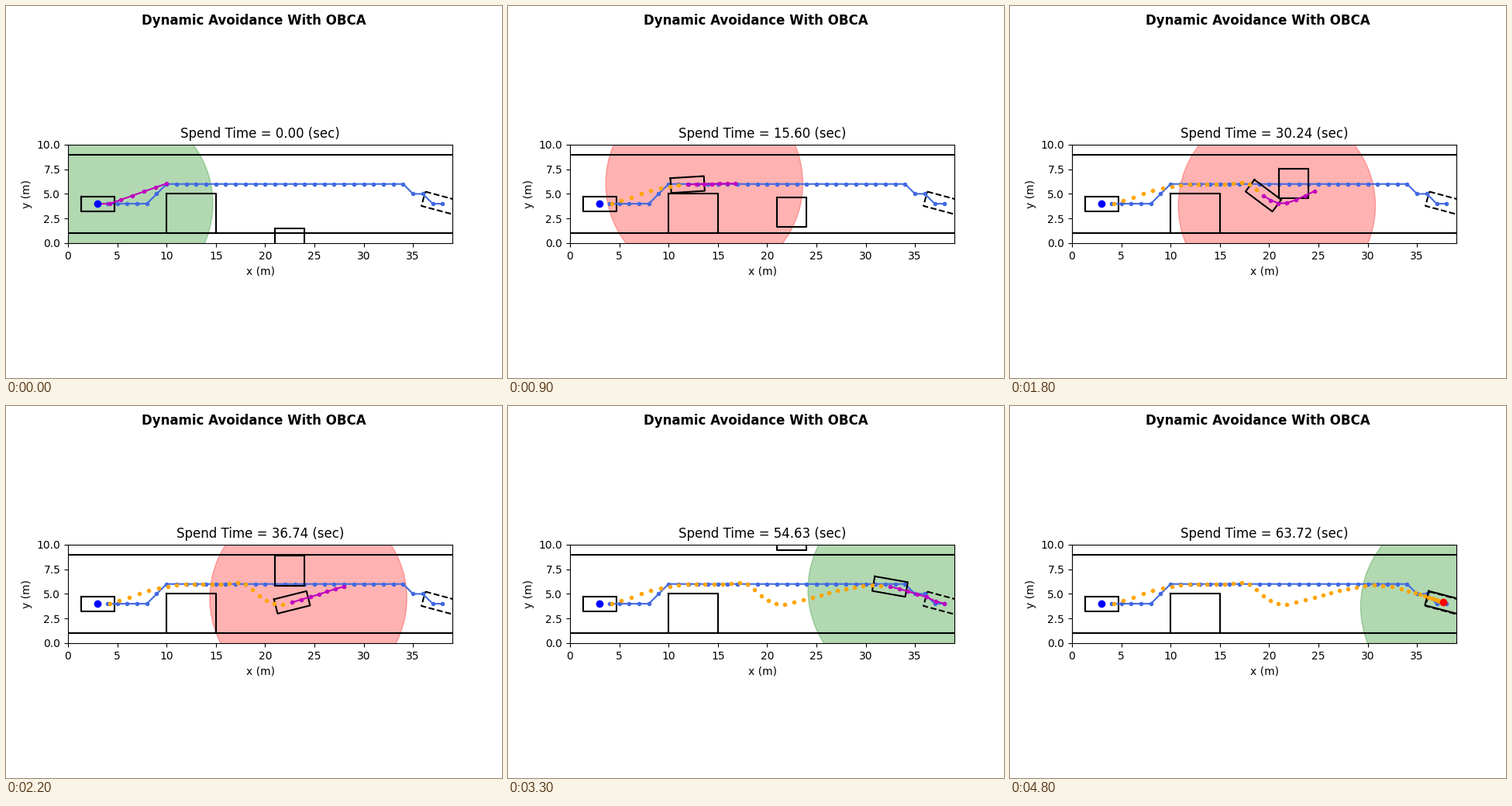
Animation, 640 px wide and 480 px high, one loop 4.9 s. Source, as a matplotlib script:

```python
import numpy as np
import matplotlib.pyplot as plt
from matplotlib.animation import FuncAnimation
from matplotlib.patches import Circle

FRAMES, INTERVAL = 49, 100
HALF_LEN, HALF_WID, SENSE = 1.7, 0.75, 10
HORIZON = 6      # steps in one plan
SWERVE = 14      # step at which plans start to bend round the mover
LAST = 33        # step at which the goal comes within one plan
GOAL = np.array([38.0, 4.0])
GOAL_TILT = -15  # degrees

# Step, x, y of the car's way points
KEYS = np.array([
    (0, 3, 4), (1, 4.23, 4), (2, 5.2, 4.31), (6, 9.18, 5.6), (8, 11.02, 5.87),
    (13, 15.47, 5.98), (16, 18.02, 5.95), (18, 19.42, 4.82), (20, 20.95, 4.01),
    (24, 24.58, 4.67), (28, 28, 5.52), (31, 30.65, 5.87), (LAST, 32.47, 5.74)])


def hermite(q, t, v):
    """Smooth curve through the points (t, v), read at q."""
    m = np.gradient(v, t)
    i = np.clip(np.searchsorted(t, q, side="right") - 1, 0, len(t) - 2)
    h = t[i + 1] - t[i]
    u = (q - t[i]) / h
    return ((1 + 2 * u) * (1 - u) ** 2 * v[i] + u * (1 - u) ** 2 * h * m[i]
            + u * u * (3 - 2 * u) * v[i + 1] + u * u * (u - 1) * h * m[i + 1])


def approach(u):
    """Points on the final stretch; u is the share of it still to go."""
    dx, dy = KEYS[-1, 1:] - GOAL
    return np.column_stack([GOAL[0] + dx * u,
                            GOAL[1] + dy * u + 0.35 * u * (1 - u)])


def route_height(x):
    return np.interp(x, [8, 10, 34, 35, 36, 37], [4, 6, 6, 5, 5, 4])


share = np.arange(HORIZON + 1) / HORIZON
steps = np.arange(LAST + 1)
cruise = np.column_stack([hermite(steps, KEYS[:, 0], KEYS[:, i]) for i in (1, 2)])

# Near the goal each step covers one sixth of what remains
left = (1 - 1 / HORIZON) ** np.arange(1, FRAMES - LAST)
track = np.vstack([cruise, approach(left)])
nominal = np.vstack([cruise, approach(1 - share[1:])])

grad = np.gradient(track, axis=0)
heading = np.arctan2(grad[:, 1], grad[:, 0])
heading[LAST + 1:] = np.radians(GOAL_TILT + 4.5 * left)

clock = np.cumsum(np.r_[0, 2.592, np.full(LAST - 1, 1.6262),
                        1.62 * np.r_[1, left[:-1]]])


def box(center, angle=0.0, hl=HALF_LEN, hw=HALF_WID):
    c, s = np.cos(angle), np.sin(angle)
    pts = np.array([(-hl, hw), (hl, hw), (hl, -hw), (-hl, -hw), (-hl, hw)])
    return (pts @ np.array([(c, s), (-s, c)]) + center).T


def plan(k):
    if k > LAST:
        return approach(left[k - LAST - 1] * (1 - share))
    if k >= SWERVE:
        pts = nominal[k:k + HORIZON + 1].copy()
        pts[:, 1] += 0.45 * share ** 3 * (route_height(pts[:, 0]) - pts[:, 1])
        return pts
    end = track[k, 0] + 7 - 0.24 * k, 6.05
    return np.vstack([track[k], np.linspace(track[k + 1], end, HORIZON)])


fig, ax = plt.subplots(figsize=(6.4, 4.8), dpi=100)
fig.suptitle("Dynamic Avoidance With OBCA", fontsize=12, fontweight="bold")
ax.set_aspect("equal")
ax.set_xlim(0, 39)
ax.set_ylim(0, 10)
ax.set_xticks(range(0, 36, 5))
ax.set_yticks(np.arange(0, 10.1, 2.5))
ax.set_xlabel("x (m)")
ax.set_ylabel("y (m)")
title = ax.set_title("")

sensor = ax.add_patch(Circle((0, 0), SENSE, alpha=0.3))

for y in (1, 9):
    ax.plot([0, 39], [y, y], "k")
ax.plot(*box((12.5, 3), hl=2.5, hw=2), "k")
ax.plot(*box(track[0]), "k")
ax.plot(*box((37.7, 4.06), np.radians(GOAL_TILT)), "k--")

route_x = np.arange(4, 39)
ax.plot(route_x, route_height(route_x), ".-", color="royalblue")

mover, = ax.plot([], [], "k")
car, = ax.plot([], [], "k")
ahead, = ax.plot([], [], "m.-")
trail, = ax.plot([], [], ".", color="orange")
ax.plot(*track[0], "bo")
finish, = ax.plot(*track[-1], "ro")


def update(k):
    t, pos, a = clock[k], track[k], heading[k]
    done = k == FRAMES - 1
    front = pos + HALF_LEN * np.array([np.cos(a), np.sin(a)])
    hazard = np.array([22.5, 0.2 * t])

    title.set_text(f"Spend Time = {t:.2f} (sec)")
    sensor.center = front
    near = np.hypot(*(front - hazard)) < SENSE
    sensor.set_color("red" if near else "green")
    mover.set_data(*box(hazard, hl=1.5, hw=1.5))
    car.set_data(*box(pos, a))
    ahead.set_data(*plan(k).T)
    ahead.set_visible(not done)
    trail.set_data(*track[1:max(k, 1)].T)
    finish.set_visible(done)
    return sensor, mover, car, ahead, trail, finish, title


anim = FuncAnimation(fig, update, frames=FRAMES, interval=INTERVAL,
                     init_func=lambda: update(0), repeat=True, repeat_delay=0)
plt.show()
```
